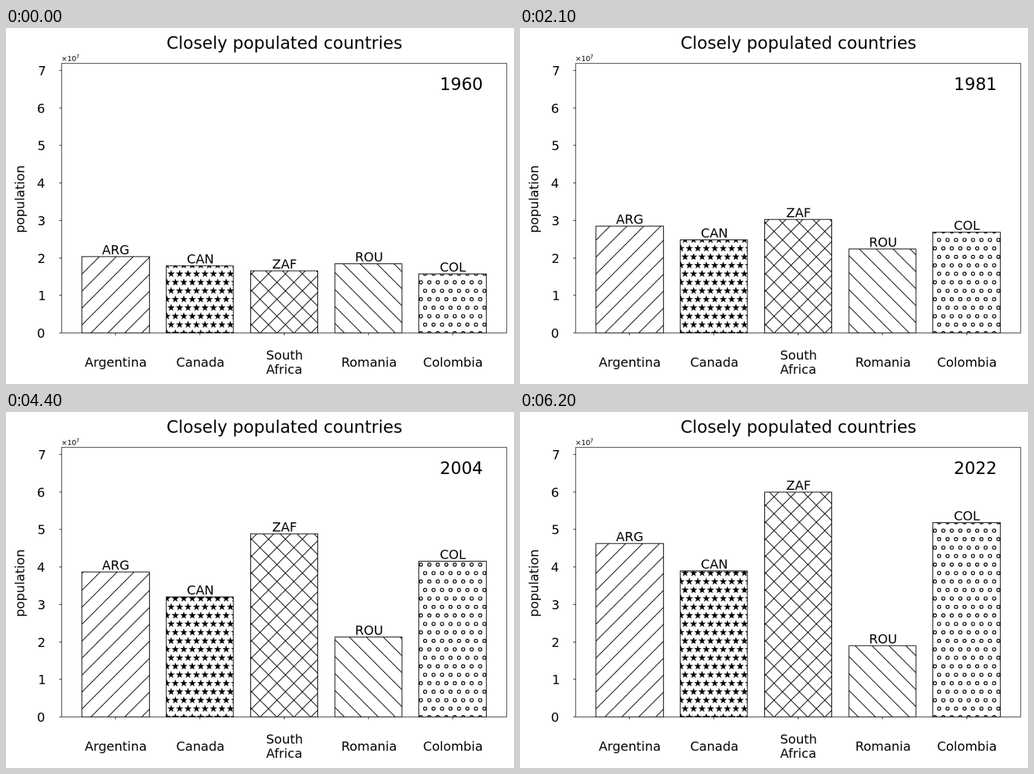
Animation of 894x626 px, one loop 6.3 s. Source, as an HTML page with a canvas:

```html
<!DOCTYPE html>
<html lang="en">
<head>
<meta charset="utf-8">
<title>Closely populated countries</title>
<style>
  html, body { margin: 0; width: 100%; height: 100%; overflow: hidden; background: #fff; }
  canvas { display: block; width: 894px; height: 626px; }
</style>
</head>
<body>
<canvas id="chart" width="1000" height="700"></canvas>
<script>
// The chart is laid out on a 1000 x 700 grid at 100 dpi and shown slightly smaller
const ctx = document.getElementById('chart').getContext('2d');
const pt = 100 / 72;

const LEFT = 109, RIGHT = 985, TOP = 70, BASE = 600;
const MILLION = 7.374;                  // pixels per million people
const SLOT = (RIGHT - LEFT) / 5.28;     // distance between bar centres
const GRID = 100 / 6;                   // hatch spacing
const FIRST_YEAR = 1960, YEARS = 63, STEP = 100;
const LABEL = 18 * pt, TITLE = 24 * pt;

// Populations in millions at a few key years, joined by a smooth curve
const keyYears = [1960, 1971, 1981, 1989, 1998, 2009, 2022];
const countries = [
  { code: 'ARG', name: ['Argentina'], hatch: () => diagonals(1),
    people: [20.35, 24.2, 28.45, 32.15, 36.23, 40.68, 46.23] },
  { code: 'CAN', name: ['Canada'], hatch: () => scatter(star),
    people: [17.91, 21.96, 24.82, 27.28, 30.16, 33.63, 38.93] },
  { code: 'ZAF', name: ['South', 'Africa'], hatch: () => { diagonals(1); diagonals(-1); },
    people: [16.52, 23.03, 30.23, 38.67, 45.85, 51.17, 59.89] },
  { code: 'ROU', name: ['Romania'], hatch: () => diagonals(-1),
    people: [18.41, 20.46, 22.35, 23.16, 22.51, 20.37, 19.04] },
  { code: 'COL', name: ['Colombia'], hatch: () => scatter(ring),
    people: [15.69, 21.45, 26.82, 31.97, 37.9, 44.35, 51.87] },
];

// Cubic Hermite curve with slopes taken from the neighbouring keys
function population(people, year) {
  const last = keyYears.length - 1;
  const slope = i => {
    const a = Math.max(0, i - 1), b = Math.min(last, i + 1);
    return (people[b] - people[a]) / (keyYears[b] - keyYears[a]);
  };
  const j = Math.max(1, keyYears.findIndex(k => k >= year)), i = j - 1;
  const span = keyYears[j] - keyYears[i];
  const u = (year - keyYears[i]) / span, v = 1 - u;
  return v * v * (1 + 2 * u) * people[i] + u * u * (1 + 2 * v) * people[j]
    + u * v * span * (v * slope(i) - u * slope(j));
}

// Pixel centres, so that thin straight lines stay crisp
const snapX = x => Math.floor(x + 0.5) + 0.5;
const snapY = y => Math.ceil(y - 0.5) - 0.5;

// Text is aligned by the width of its ink: 0 = left, 0.5 = centre, 1 = right
function text(str, x, y, size, align = 0.5) {
  ctx.font = `${size}px "DejaVu Sans", sans-serif`;
  const m = ctx.measureText(str);
  const ink = m.actualBoundingBoxLeft + m.actualBoundingBoxRight;
  ctx.fillText(str, Math.round(x - ink * align), Math.round(y));
}

function line(x1, y1, x2, y2) {
  ctx.beginPath();
  ctx.moveTo(x1, y1);
  ctx.lineTo(x2, y2);
  ctx.stroke();
}

function diagonals(dir) {
  for (let k = -21; k < 51; k++) {
    const x = k * GRID * 2;
    line(x, 0, x - dir * 700, 700);
  }
}

// Staggered rows of marks; the current clip limits them to one bar
function scatter(mark) {
  for (let row = 8; row < 38; row++)
    for (let col = 17; col < 59; col++)
      mark((col + row % 2 / 2) * GRID, row * GRID);
}

function star(x, y) {
  ctx.beginPath();
  for (let i = 0; i < 10; i++) {
    const r = GRID / 3 * (i % 2 ? 0.382 : 1), a = i * Math.PI / 5;
    ctx.lineTo(x + r * Math.sin(a), y - r * Math.cos(a));
  }
  ctx.closePath();
  ctx.fill();
  ctx.stroke();
}

function ring(x, y) {
  ctx.lineWidth = 1.72;
  ctx.beginPath();
  ctx.arc(x, y, GRID * 0.19, 0, 2 * Math.PI);
  ctx.stroke();
}

function drawBar({ code, name, people, hatch }, index, year) {
  const x = LEFT + (index + 0.64) * SLOT;
  const top = BASE - population(people, year) * MILLION;
  const x1 = snapX(x - 0.4 * SLOT), x2 = snapX(x + 0.4 * SLOT);
  const y1 = snapY(top), y2 = snapY(BASE);
  const box = [x1, y1, x2 - x1, y2 - y1];

  ctx.lineWidth = pt;
  ctx.save();
  ctx.beginPath();
  ctx.rect(...box);
  ctx.clip();
  hatch();
  ctx.restore();
  ctx.strokeRect(...box);
  text(code, x, top - 5, LABEL);

  ctx.lineWidth = 0.8 * pt;
  line(snapX(x), y2, snapX(x), y2 + 3.5 * pt);
  name.forEach((word, i) => text(word, x, 666 + (i - (name.length - 1) / 2) * 28, LABEL));
}

function drawAxes() {
  const x1 = snapX(LEFT), y1 = snapY(TOP);
  ctx.lineWidth = 0.8 * pt;
  ctx.strokeRect(x1, y1, snapX(RIGHT) - x1, snapY(BASE) - y1);
  for (let n = 0; n <= 7; n++) {
    const y = BASE - n * 10 * MILLION;
    line(x1 - 3.5 * pt, snapY(y), x1, snapY(y));
    text(n, 75, y + 9, LABEL, 1);
  }
  text('×10', LEFT, 65, 10 * pt, 0);
  text('7', LEFT + 29, 60, 7 * pt, 0);
  text('Closely populated countries', (LEFT + RIGHT) / 2, 41, TITLE);

  ctx.save();
  ctx.translate(36, 338);
  ctx.rotate(-Math.PI / 2);
  text('population', 0, 0, LABEL);
  ctx.restore();
}

function draw() {
  const year = FIRST_YEAR + Math.floor(performance.now() / STEP) % YEARS;
  ctx.fillStyle = '#fff';
  ctx.fillRect(0, 0, 1000, 700);
  ctx.fillStyle = ctx.strokeStyle = '#000';
  countries.forEach((country, i) => drawBar(country, i, year));
  drawAxes();
  text(year, 854, 122, TITLE, 0);
  requestAnimationFrame(draw);
}
draw();
</script>
</body>
</html>
```
